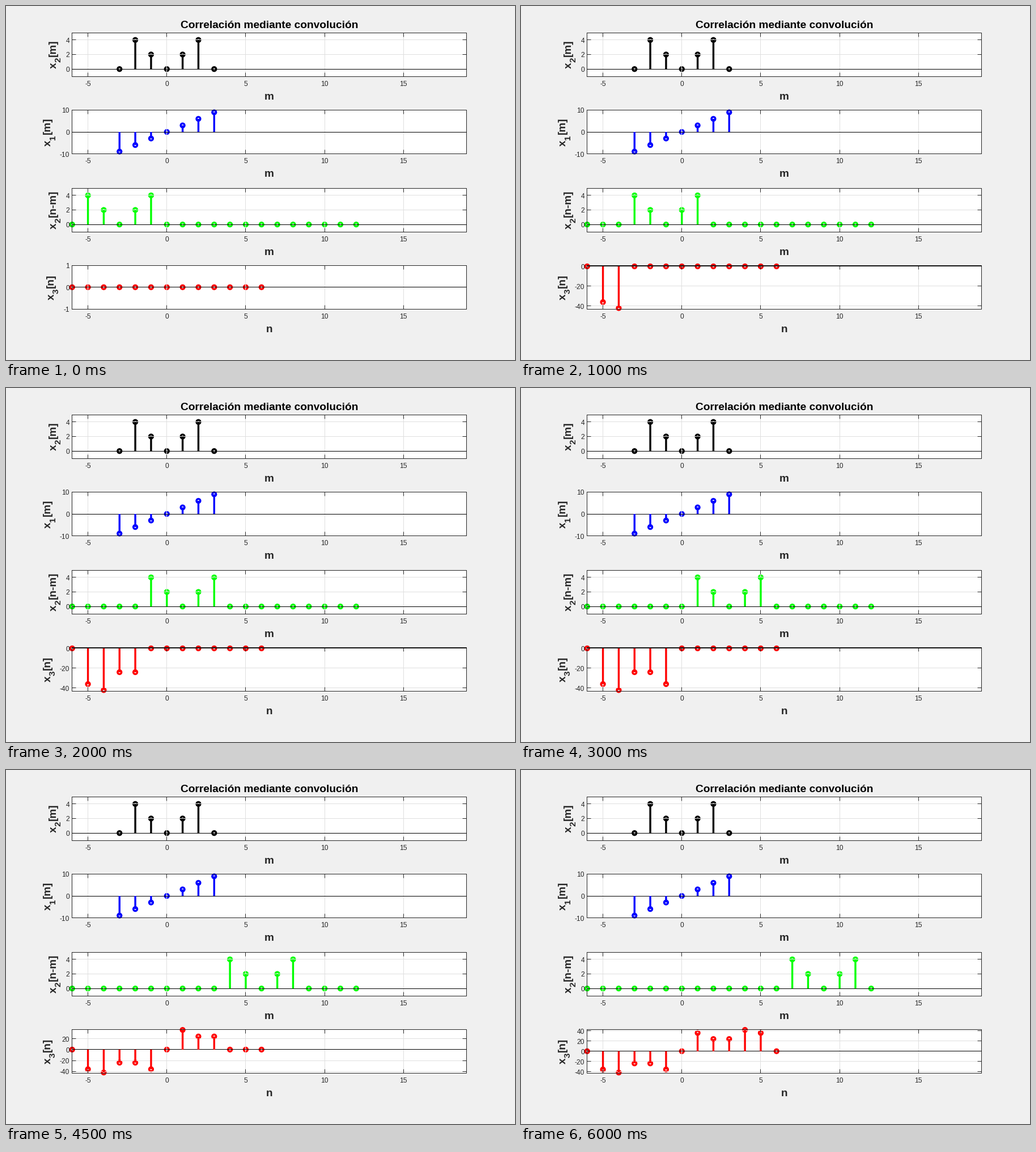
These frames come from a looping animation (898 px wide and 624 px high, 6.5 s). A matplotlib script:

```python
import math

import numpy as np
import matplotlib.pyplot as plt
from matplotlib.animation import FuncAnimation
from matplotlib.patches import Circle, Rectangle

WIDTH, HEIGHT, DPI = 898, 624, 64
PT = 72 / DPI  # points per pixel
LEFT, RIGHT = 0.13 * WIDTH, 0.905 * WIDTH
PANEL_HEIGHT = 77
X_MIN, X_MAX = -6, 19
INK = "#262626"
GRID = "#dfdfdf"
TICK = 7
STEM = 3.4
RADIUS = 3.4
LABEL_SIZE = 19
SUB_SIZE = 15.2

m = np.arange(-3, 4)
x1 = 3 * m
x2 = np.array([0, 4, 2, 0, 2, 4, 0])
x3 = np.convolve(x1, x2)
n = np.arange(-6, 7)
m_wide = np.arange(-6, 13)

fig = plt.figure(figsize=(WIDTH / DPI, HEIGHT / DPI), dpi=DPI,
                 facecolor="#f0f0f0")
ax = fig.add_axes([0, 0, 1, 1])


def line(xs, ys, color=INK, cap="butt"):
    """Crisp one pixel line."""
    ax.plot(np.floor(xs), np.floor(ys), color=color, lw=PT,
            solid_capstyle=cap, clip_on=False)


def text(x, y, s, size=12, color=INK, **kw):
    ax.text(x, y, s, fontsize=size * PT, color=color, va="baseline",
            fontfamily="Liberation Sans", **kw)


def to_x(v):
    return LEFT + (v - X_MIN) * (RIGHT - LEFT) / (X_MAX - X_MIN)


def side_label(x, y, digit, rest):
    """Rotated x with a subscript, read upwards from y."""
    kw = dict(rotation=90, rotation_mode="anchor", ha="left", weight="bold")
    text(x, y, "x", LABEL_SIZE, **kw)
    y -= 0.556 * LABEL_SIZE
    text(x + 7.5, y, digit, SUB_SIZE, **kw)
    y -= 0.556 * SUB_SIZE + 1.5
    text(x - 1, y, rest, LABEL_SIZE, **kw)


def panel(top, limits, xs, ys, color, x_label, digit, rest, start):
    lo, hi = limits
    bottom = top + PANEL_HEIGHT

    def to_y(v):
        return bottom - (v - lo) * PANEL_HEIGHT / (hi - lo)

    step = next(s for s in (1, 2, 10, 20) if (hi - lo) / s < 4.35)
    y_ticks = [i * step for i in range(math.ceil(lo / step),
                                       math.floor(hi / step) + 1)]
    x_ticks = range(-5, 16, 5)

    ax.add_patch(Rectangle((math.floor(LEFT), math.floor(top)),
                           math.floor(RIGHT) - math.floor(LEFT),
                           PANEL_HEIGHT, facecolor="white", lw=0))
    for v in x_ticks:
        line([to_x(v)] * 2, [top, bottom], GRID)
    for v in y_ticks:
        line([LEFT, RIGHT], [to_y(v)] * 2, GRID)

    for v in x_ticks:
        x = to_x(v)
        line([x, x], [top, top + TICK])
        line([x, x], [bottom - TICK, bottom])
        text(x, math.floor(bottom) + 17, str(v), ha="center")
    for v in y_ticks:
        y = to_y(v)
        line([LEFT, LEFT + TICK], [y, y])
        line([RIGHT - TICK, RIGHT], [y, y])
        text(112, y + 5, str(v), ha="right")
    line([LEFT, RIGHT, RIGHT, LEFT, LEFT], [top, top, bottom, bottom, top],
         cap="projecting")

    zero = to_y(0)
    line([LEFT, RIGHT], [zero, zero], "black")
    for a, b in zip(xs, ys):
        x, y = to_x(a), to_y(b)
        if b:
            ax.plot([x, x], [zero, y], color=color, lw=STEM * PT,
                    solid_capstyle="butt", snap=False, clip_on=False)
        ax.add_patch(Circle((x, y), RADIUS, fill=False, edgecolor=color,
                            lw=STEM * PT, clip_on=False))

    text(464.5, math.floor(bottom) + 41, x_label, LABEL_SIZE, ha="center",
         weight="bold")
    # The side label keeps clear of the widest tick label.
    widest = max(0.556 * len(str(abs(v))) + 0.333 * (v < 0) for v in y_ticks)
    side_label(round(96 - 12 * widest), start, digit, rest)


def draw(k):
    ax.clear()
    ax.set_xlim(0, WIDTH)
    ax.set_ylim(HEIGHT, 0)
    ax.axis("off")

    shifted = np.zeros(len(m_wide), int)
    shifted[k:k + len(x2)] = x2
    total = np.where(np.arange(len(n)) <= k, x3, 0)

    text(464.4, 39, "Correlación mediante convolución", 19.15, "black",
         ha="center", weight="bold")
    panel(47, (-1, 5), m, x2, "black", "m", "2", "[m]", 110)
    panel(183.5, (-10, 10), m, x1, "#0000ff", "m", "1", "[m]", 247)
    panel(321, (-1, 5), m_wide, shifted, "#00ff00", "m", "2", "[n-m]", 393)
    panel(457.2, (total.min() - 1, total.max() + 1), n, total, "#ff0000",
          "n", "3", "[n]", 518)
    return []


anim = FuncAnimation(fig, draw, frames=len(n), interval=500, repeat=True,
                     repeat_delay=0)
plt.show()
```
